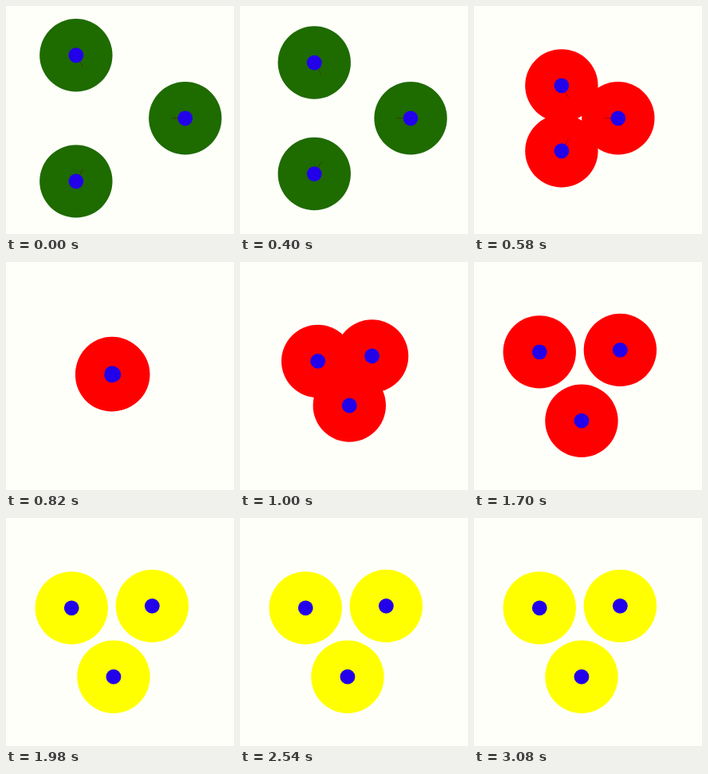
An HTML page with a canvas for the animation above (3100 ms loop, 286 by 286 pixels).

```html
<!DOCTYPE html>
<html lang="en">
<head>
<meta charset="utf-8">
<title>Three agents</title>
<style>
html, body { margin: 0; width: 100%; height: 100%; overflow: hidden; background: #fffffa; }
canvas { display: block; width: 286px; height: 286px; }
</style>
</head>
<body>
<canvas id="stage" width="286" height="286"></canvas>
<script>
const ctx = document.getElementById('stage').getContext('2d');
const LOOP = 3100;
const CX = 133.5, CY = 140.8;
const RANGE = 45.7, BODY = 9.4, HEADING = 17.5;
const RAD = Math.PI / 180;

const clamp = x => Math.max(0, Math.min(1, x));
const smooth = x => x * x * (3 - 2 * x);

// Each 140 ms holds three steps: 100, 20 and 20 ms.
function stepAt(t) {
  if (t < 20) return 0;
  const r = (t - 20) % 140;
  return 1 + 3 * Math.floor((t - 20) / 140) + (r < 100 ? 0 : r < 120 ? 1 : 2);
}

function hermite(a, b, va, vb, span, u) {
  const u2 = u * u, u3 = u2 * u;
  return a * (2 * u3 - 3 * u2 + 1) + b * (3 * u2 - 2 * u3)
    + span * (va * (u3 - 2 * u2 + u) + vb * (u3 - u2));
}

// Signed distance from the middle: inward, through, then settling outside.
function distance(n) {
  if (n <= 13) return 91.3 - 44 * Math.pow(n / 13, 2.9);
  if (n <= 22) return hermite(47.3, -39.4, -9.8, -2.3, 9, (n - 13) / 9);
  return -58.4 + 19 * Math.pow(1 - clamp((n - 22) / 13), 1.57);
}

function turn(n) {
  return 24.5 * smooth(clamp((n - 14) / 7)) + 4.1 * smooth(clamp((n - 26) / 9));
}

function disc(x, y, r, color) {
  ctx.fillStyle = color;
  ctx.beginPath();
  ctx.arc(x, y, r, 0, 2 * Math.PI);
  ctx.fill();
}

function draw(t) {
  const n = stepAt(t);
  const d = distance(n);
  const color = n < 12 ? '#1e6b00' : t < 1900 ? '#ff0000' : '#ffff00';
  const agents = [-120, 0, 120].map(deg => {
    const a = (deg + turn(n)) * RAD;
    return { a, x: CX + d * Math.cos(a), y: CY + d * Math.sin(a) };
  });

  ctx.fillStyle = '#fffffa';
  ctx.fillRect(0, 0, 286, 286);
  for (const p of agents) disc(p.x, p.y, RANGE, color);

  if (n < 17) {
    ctx.strokeStyle = 'rgba(80, 15, 15, 0.5)';
    ctx.lineWidth = 1;
    for (const p of agents) {
      ctx.beginPath();
      ctx.moveTo(p.x, p.y);
      ctx.lineTo(p.x - HEADING * Math.cos(p.a), p.y - HEADING * Math.sin(p.a));
      ctx.stroke();
    }
  }
  for (const p of agents) disc(p.x, p.y, BODY, '#2200ea');
}

const start = performance.now();
function tick() {
  draw((performance.now() - start) % LOOP);
  requestAnimationFrame(tick);
}
tick();
</script>
</body>
</html>
```
